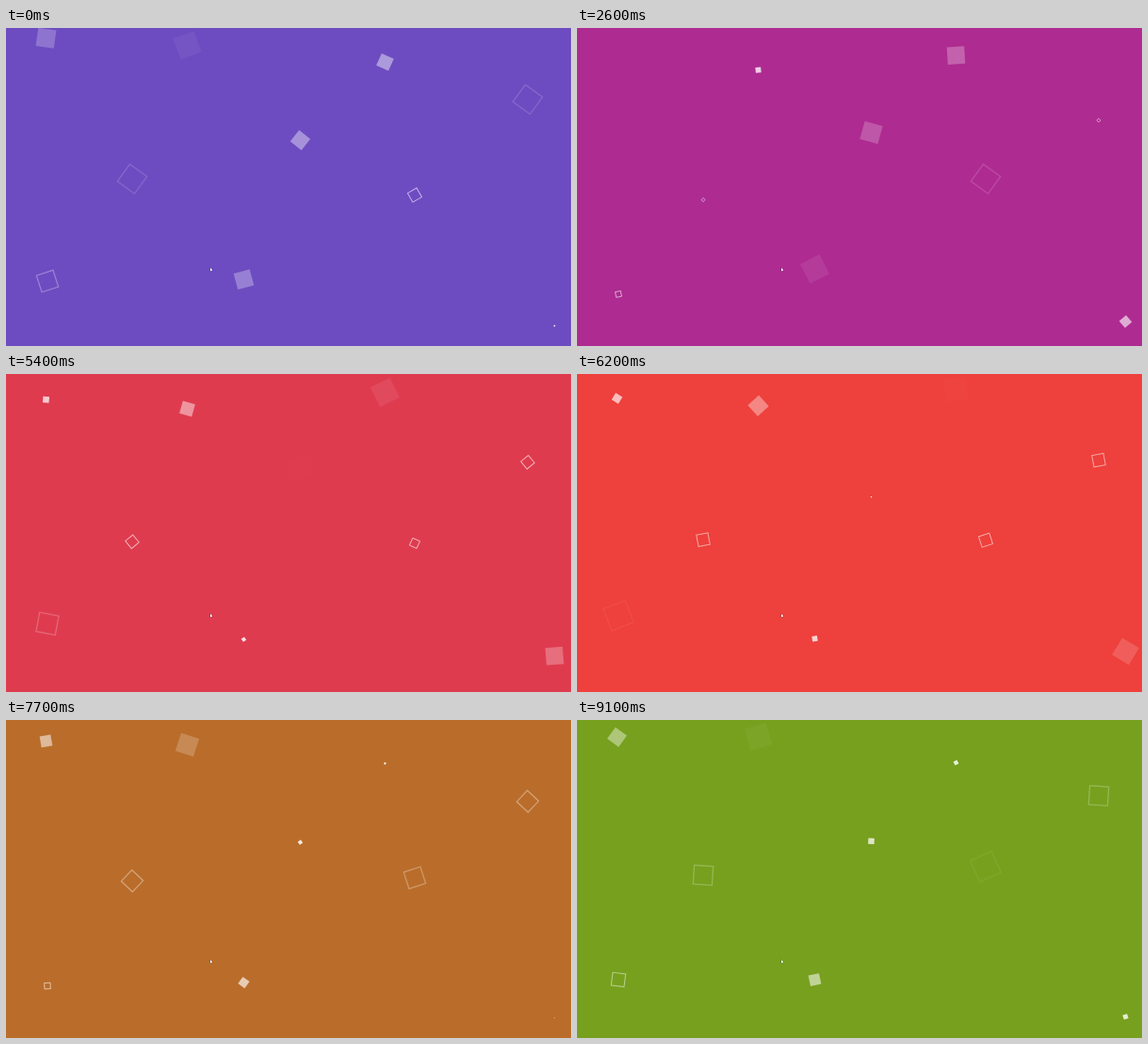
These frames come from a looping animation (600 px wide and 338 px high, 9.2 s). An HTML page with a canvas:

```html
<!DOCTYPE html>
<html lang="en">
<head>
<meta charset="utf-8">
<title>Rising squares</title>
<style>
  html, body { margin: 0; width: 100%; height: 100%; overflow: hidden; background: #6b4cc1; }
  canvas { display: block; width: 100vw; height: 100vh; }
</style>
</head>
<body>
<canvas id="stage" width="600" height="338"></canvas>
<script>
const W = 600, H = 338;
const LOOP = 9200, STEP = 100;
const LEAD = 8.5;                      // seconds already run when the loop starts
const SIZE = 25, BORDER = 1.5, RISE = 31.25;
const SKY_SPAN = 5, SKY_LEAD = 3.5;    // seconds per colour blend, seconds into the first

const ctx = document.getElementById('stage').getContext('2d');

const square = (left, top, period, hollow = false) =>
  ({ x: left * W, y: top * H, period, hollow });

const squares = [
  square(0.05, 0.05, 11),
  square(0.30, 0.10, 9),
  square(0.65, 0.10, 15),
  square(0.50, 0.35, 14),
  square(0.40, 0.80, 12),
  square(0.95, 0.90, 8),
  square(0.20, 0.50, 10, true),
  square(0.70, 0.50, 6, true),
  square(0.90, 0.25, 10, true),
  square(0.05, 0.80, 5, true)
];

// blue, purple, red, green
const sky = ['#03a9f4', '#9a24ab', '#f34235', '#05f609'].map(hex =>
  [1, 3, 5].map(i => parseInt(hex.slice(i, i + 2), 16)));

function skyColor(sec) {
  const pos = (sec + SKY_LEAD) / SKY_SPAN;
  const i = Math.floor(pos), k = pos - i;
  const mix = sky[i].map((v, n) => Math.round(v + (sky[i + 1][n] - v) * k));
  return `rgb(${mix})`;
}

function drawSquare({ x, y, period, hollow }, sec) {
  const p = ((sec + LEAD) / period) % 1;
  if (!p) return;
  const half = SIZE / 2 + (hollow ? BORDER : 0);
  ctx.save();
  ctx.globalAlpha = 1 - p;
  ctx.translate(x + half, y + half - RISE * p * p);
  ctx.rotate(p * Math.PI * 2);
  if (hollow) {
    // the line thins more slowly than the square shrinks
    const side = (SIZE + BORDER) * p;
    ctx.lineWidth = BORDER * Math.sqrt(p);
    ctx.strokeRect(-side / 2, -side / 2, side, side);
  } else {
    const side = SIZE * p;
    ctx.fillRect(-side / 2, -side / 2, side, side);
  }
  ctx.restore();
}

function drawPointer() {
  ctx.beginPath();
  ctx.moveTo(217, 254.8);
  ctx.lineTo(219.2, 257.6);
  ctx.lineTo(217, 258.4);
  ctx.closePath();
  ctx.lineWidth = 0.8;
  ctx.strokeStyle = 'rgba(20, 40, 60, 0.5)';
  ctx.stroke();
  ctx.fill();
}

function draw(sec) {
  ctx.fillStyle = skyColor(sec);
  ctx.fillRect(0, 0, W, H);
  ctx.fillStyle = ctx.strokeStyle = '#fff';
  for (const s of squares) drawSquare(s, sec);
  drawPointer();
}

const start = performance.now();
function tick() {
  const t = (performance.now() - start) % LOOP;
  draw(Math.floor(t / STEP) * STEP / 1000);
  requestAnimationFrame(tick);
}
tick();
</script>
</body>
</html>
```
